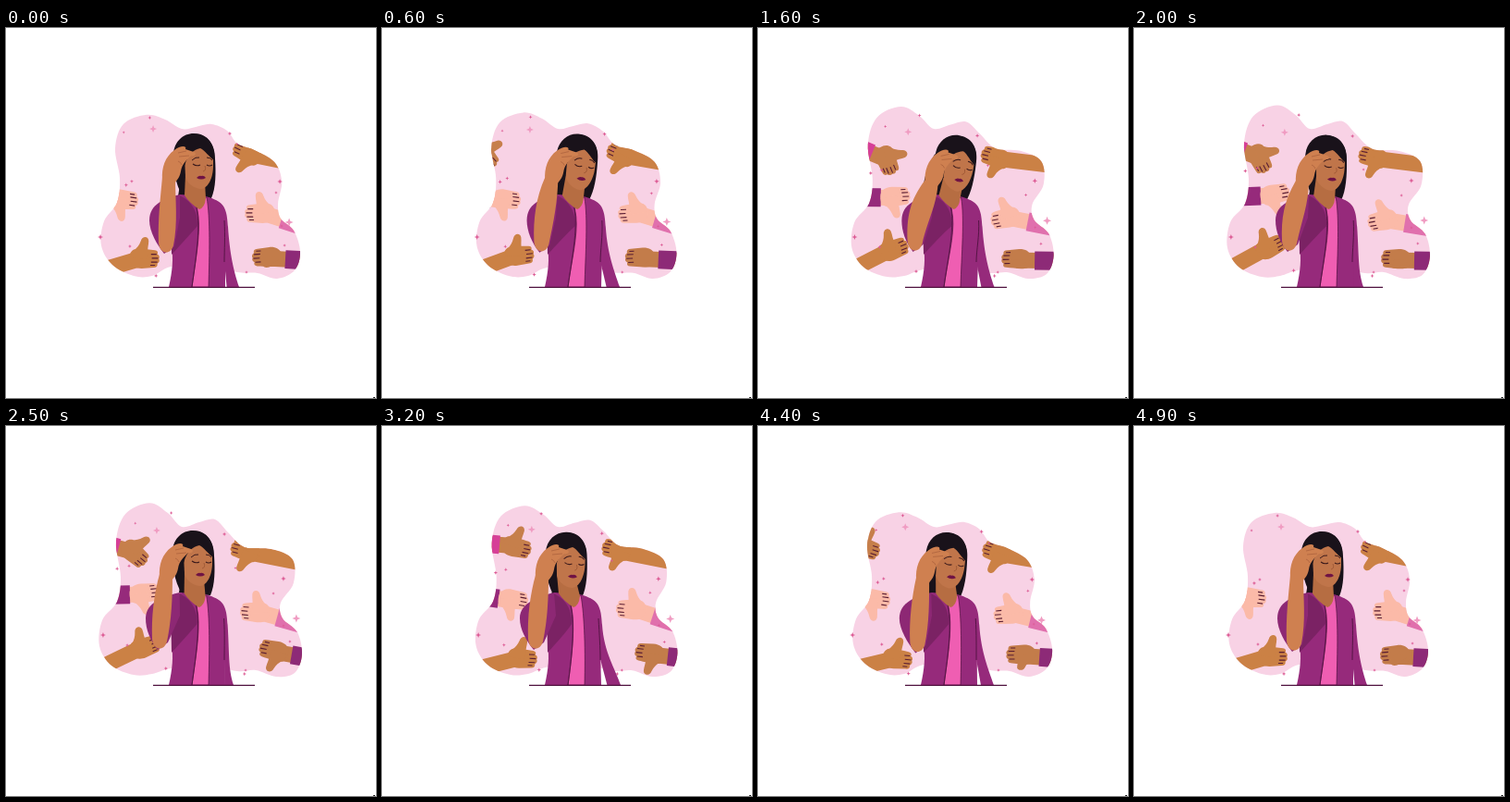
Write an HTML page with a canvas that moves like this. It is 400 px wide and 400 px high and loops after 5 s.

```html
<!DOCTYPE html>
<html lang="en">
<head>
<meta charset="utf-8">
<title>Thumbs</title>
<style>
html, body { margin: 0; width: 100%; height: 100%; overflow: hidden; background: #fff }
canvas { display: block; width: 400px; height: 400px }
</style>
</head>
<body>
<canvas id="stage" width="400" height="400"></canvas>
<script>
const c = document.getElementById('stage').getContext('2d');
const LOOP = 5000, STEP = 100, SPAN = 4900;
const times = [0, 1200, 2000, 2500, 3200, 4000];
const n = times.length;
const brown = '#cb8145', pale = '#fbbaa8', plum = '#962a7b', dark = '#7b2264',
      arm = '#cf8050', face = '#c0754a', hair = '#19121a', ink = '#4f123f';

// Smooth periodic curve through one value per entry of times
const timeAt = i => times[(i + n) % n] + Math.floor(i / n) * SPAN;
function at(v, t) {
  t = Math.min(t, SPAN);
  let i = n - 1;
  while (times[i] > t) i--;
  const val = j => v[(j + n) % n];
  const slope = j => (val(j + 1) - val(j - 1)) / (timeAt(j + 1) - timeAt(j - 1));
  const d = timeAt(i + 1) - times[i], u = (t - times[i]) / d, w = 1 - u;
  return w * w * (1 + 2 * u) * val(i) + u * u * (3 - 2 * u) * val(i + 1)
    + d * u * w * (w * slope(i) - u * slope(i + 1));
}
const mix = (a, b, k) => a + (b - a) * k;

function draw(d, fill, stroke, width = 1) {
  const p = new Path2D(d);
  if (fill) { c.fillStyle = fill; c.fill(p); }
  if (stroke) { c.strokeStyle = stroke; c.lineWidth = width; c.stroke(p); }
}

// Backdrop outline: small and large state
const small = [[152, 94], [127, 104], [118, 130], [123, 162], [120, 189], [106, 209], [103, 235],
  [115, 256], [138, 268], [158, 268], [178, 258], [215, 255], [250, 264], [272, 265], [293, 271], [312, 262],
  [318, 242], [311, 219], [297, 206], [294, 190], [298, 166], [290, 145], [268, 132], [250, 125],
  [239, 111], [222, 104], [205, 107], [190, 109], [172, 99]];
const large = [[155, 83], [129, 95], [119, 125], [124, 163], [120, 190], [104, 210], [101, 238],
  [114, 259], [138, 269], [158, 268], [178, 262], [215, 258], [250, 265], [270, 264], [292, 271], [312, 267],
  [320, 247], [315, 223], [299, 208], [297, 191], [311, 170], [310, 144], [287, 133], [258, 131],
  [240, 115], [226, 101], [209, 104], [190, 109], [175, 94]];

function blob(k) {
  const pts = small.map(([x, y], i) => [mix(x, large[i][0], k), mix(y, large[i][1], k)]);
  const get = i => pts[(i + pts.length) % pts.length];
  const path = new Path2D();
  path.moveTo(...pts[0]);
  pts.forEach((p, i) => {
    const a = get(i - 1), q = get(i + 1), b = get(i + 2);
    path.bezierCurveTo(p[0] + (q[0] - a[0]) / 6, p[1] + (q[1] - a[1]) / 6,
      q[0] - (b[0] - p[0]) / 6, q[1] - (b[1] - p[1]) / 6, ...q);
  });
  return path;
}

// sx, sy mirror a right-pointing thumbs-up; ends is where the forearm leaves the backdrop
const hands = [
  { sx: 1, sy: 1, skin: '#c67f4b', cuff: '#d63f97', gap: 19, ends: [100, 126],
    x: [92, 140, 137, 140, 146, 141], y: [131, 143, 141, 137, 130, 131], a: [30, 65, 62, 40, 12, 12] },
  { sx: 1, sy: -1, skin: pale, cuff: plum, gap: 16, ends: [100, 183],
    x: [127, 143, 153, 150, 142, 130], y: [187, 186, 181, 182, 189, 190], a: [8, 5, -10, -5, 10, 8] },
  { sx: 1, sy: 1, skin: brown, ends: [96, 264],
    x: [150, 147, 147, 150, 152, 152], y: [248, 241, 236, 238, 250, 252], a: [0, -15, -28, -22, 3, 8] },
  { sx: -1, sy: -1, skin: brown, ends: [330, 150],
    x: [260, 255, 258, 258, 253, 255], y: [136, 140, 141, 136, 135, 139], a: [25, 18, 12, 15, 12, 10] },
  { sx: -1, sy: 1, skin: pale, cuff: '#e070ad', gap: 25, ends: [330, 217],
    x: [274, 267, 268, 269, 269, 267], y: [199, 201, 207, 200, 197, 204], a: [0, -8, -10, 5, 5, -8] },
  { sx: -1, sy: -1, skin: '#c37c4a', cuff: '#8d2a77', gap: 20, ends: [335, 252],
    x: [282, 277, 283, 289, 289, 286], y: [249, 250, 251, 244, 247, 248], a: [-4, 0, 0, 12, 6, 3],
    thumb: [.45, .35, .4, 1, 1, .9] }
];

function line(x1, y1, x2, y2, color, width) {
  draw(`M${x1},${y1}L${x2},${y2}`, null, color, width);
}

function drawHand(h, t) {
  const x = at(h.x, t), y = at(h.y, t), [ex, ey] = h.ends;
  line(x, y, ex, ey, h.skin, 17);
  if (h.cuff) {
    const r = h.gap / Math.hypot(ex - x, ey - y);
    line(mix(x, ex, r), mix(y, ey, r), ex, ey, h.cuff, 20);
  }
  c.save();
  c.translate(x, y);
  c.rotate(at(h.a, t) * Math.PI / 180);
  c.scale(.85 * h.sx, .85 * h.sy);
  draw('M-14,-10C-8,-12 4,-10 13,-9Q18,-8 16,-4Q20,-2 18,2Q20,5 16,8Q17,13 11,13L-4,14C-12,14 -17,11 -19,5C-20,-2 -19,-7 -14,-10Z', h.skin);
  c.save();
  c.scale(1, h.thumb ? at(h.thumb, t) : 1);
  draw('M-19,0C-17,-9 -9,-10 -5,-21C-3,-28 5,-27 5,-21C5,-16 3,-11 4,-5L2,3Z', h.skin);
  c.restore();
  draw('M8,-4H15M9,1H17M8,6H16M7,10H13', null, '#5a1d33', 1.3);
  c.restore();
}

// x, y in the small state, x, y in the large state, radius
const sparks = [
  [155, 97, 179, 94, 2], [127, 113, 140, 105, 1.6], [159, 109, 163, 113, 4],
  [130, 170, 120, 154, 2.2], [136, 166, 133, 151, 2], [242, 114, 236, 117, 2.2],
  [250, 125, 248, 154, 1.6], [296, 166, 300, 165, 2.8], [292, 178, 289, 181, 1.8],
  [306, 210, 314, 208, 4.5], [298, 214, 300, 216, 1.6], [102, 226, 105, 226, 3],
  [134, 236, 131, 237, 2], [162, 268, 173, 262, 2.2], [245, 268, 258, 268, 2.2],
  [260, 264, 259, 264, 1.8], [301, 235, 307, 233, 1.8]];

function drawSpark([x1, y1, x2, y2, r], k) {
  const x = mix(x1, x2, k), y = mix(y1, y2, k);
  c.fillStyle = r > 3.5 ? '#f09cc2' : '#dc5a94';
  c.beginPath();
  for (let i = 0; i < 8; i++) {
    const q = i % 2 ? r * .4 : r, a = i * Math.PI / 4;
    c.lineTo(x + q * Math.cos(a), y + q * Math.sin(a));
  }
  c.fill();
}

const pose = {
  headX: [211, 219, 214, 210, 206, 208], headY: [161, 164, 163, 160, 162, 164], tilt: [0, 15, 3, 0, 2, 11],
  lockX: [187, 167, 190, 188, 184, 160], lockY: [182, 188, 182, 180, 184, 194],
  wristX: [176, 190, 182, 173, 173, 180], wristY: [161, 163, 165, 160, 161, 165],
  elbowX: [174, 172, 169, 167, 167, 172], elbowY: [236, 234, 234, 234, 234, 238],
  sleeve: [155, 157, 153, 151, 149, 151], hem: [252, 261, 248, 246, 258, 258]
};

function inHead(p, paint) {
  c.save();
  c.translate(p.headX, p.headY);
  c.rotate(p.tilt * Math.PI / 180);
  paint();
  c.restore();
}

function woman(t) {
  const p = {};
  for (const key in pose) p[key] = at(pose[key], t);
  const { headX: hx, headY: hy, lockX: lx, lockY: ly, wristX: wx, wristY: wy,
          elbowX: ex, elbowY: ey, sleeve: sl, hem } = p;
  const s = (hx - 211) * .4, gap = Math.max(0, hem - 250) * .8;

  // Hair behind
  draw(`M${hx - 26},${hy - 28}C${lx + 4},${hy - 12} ${lx + 2},${ly - 18} ${lx - 1},${ly}L${lx + 16},${ly}L${hx - 6},${hy + 8}Z`, hair);
  if (lx < 176) line(hx - 27, hy - 18, lx + 4, ly - 3, '#fff', 1.4);
  inHead(p, () => draw('M-8,-47C8,-47 15,-34 15,-20C16,-5 16,12 11,23L-20,21C-28,8 -31,-12 -30,-25C-29,-38 -20,-47 -8,-47Z', hair));

  // Jacket and shirt
  draw(`M${226 + s},186C${239 + s},190 ${239 + s},204 ${240 + s},215C${242 + s},245 ${hem - 6},262 ${hem},280H${237 + gap}L236,252L${232 + s},215Z`, plum);
  draw(`M${188 + s},180L${216 + s},182C${230 + s},186 ${236 + s},190 ${237 + s},206L237,280H176C180,262 181,250 179,236Z`, plum);
  draw(`M${236 + s},208C${237 + s},225 236,240 236,253`, null, ink, .9);
  draw(`M${205 + s},185L${217 + s},183C${221 + s},205 220,245 219,280H201C205,250 ${210 + s},225 ${208 + s},204Z`, '#ef5eb2', ink, .7);
  draw(`M${187 + s},181C${200 + s},186 ${208 + s},199 ${207 + s},214C200,222 188,235 179,245L178,190Z`, dark);
  draw(`M${205 + s},190C${211 + s},212 206,245 201,280`, null, ink, .8);

  // Neck and head
  draw(`M${hx - 17},${hy - 2}L${hx + 4},${hy + 6}L${216 + s},184Q${215 + s},194 ${209 + s},196Q${199 + s},190 ${193 + s},181Z`, '#b66d42');
  inHead(p, () => {
    draw('M-18,-22L-17,0C-15,8 -6,13 0,13C8,12 13,0 13,-12L13,-28C0,-38 -12,-34 -18,-22Z', face);
    draw('M-25,-18C-26,-46 -8,-49 0,-45C10,-42 16,-30 14,-18C9,-21 4,-29 -1,-31C-8,-29 -14,-26 -18,-12Z', hair);
    draw('M-10,-18Q-6,-22 -2,-21M6,-21Q10,-21 12,-18', null, '#3b1a1c', 1);
    draw('M-9,-14Q-5,-11 -1,-13M6,-13Q9,-11 12,-13', null, '#3b1a1c', 1.1);
    draw('M4,-12Q6,-7 2,-6', null, '#9b5534', .8);
    draw('M-5,1Q-2,-2 0,-1Q3,-2 5,1Q0,4 -5,1Z', '#701344');
  });

  // Raised arm
  draw(`M${188 + s},180C172,184 ${sl},190 ${sl},208C${sl},220 ${ex - 11},${ey - 2} ${ex - 3},${ey + 8}L${ex + 8},${ey}L188,205Z`, '#8d2874');
  draw(`M${wx - 7},${wy}C${ex - 7},${wy + 22} ${ex - 10},${ey - 28} ${ex - 9},${ey - 4}C${ex - 8},${ey + 9} ${ex + 4},${ey + 10} ${ex + 7},${ey - 1}C${ex + 12},${ey - 25} ${wx + 7},${wy + 25} ${wx + 7},${wy}Z`, arm);
  c.save();
  c.translate(wx, wy);
  draw('M-7,3C-8,-10 -4,-22 6,-29C12,-34 20,-34 18,-30L27,-27C31,-25 28,-22 24,-23C20,-19 14,-14 13,-6C12,0 9,3 7,6Z', arm);
  draw('M10,-26L19,-28M11,-22L22,-23M10,-17Q13,-16 14,-13', null, '#ad633e', .8);
  c.restore();

  line(159, 280.4, 269, 280.4, ink, 1.3);
}

function frame(now) {
  const t = Math.floor(now % LOOP / STEP) * STEP;
  const k = (1 - Math.cos(2 * Math.PI * (t + 200) / LOOP)) / 2;
  c.fillStyle = '#fff';
  c.fillRect(0, 0, 400, 400);
  c.save();
  const back = blob(k);
  c.fillStyle = '#f8d2e5';
  c.fill(back);
  c.clip(back);
  hands.forEach(h => drawHand(h, t));
  c.restore();
  sparks.forEach(s => drawSpark(s, k));
  woman(t);
  c.fillStyle = '#222';
  c.fillRect(397, 399, 2, 1);
}

const start = performance.now();
function tick() {
  frame(performance.now() - start);
  requestAnimationFrame(tick);
}
tick();
</script>
</body>
</html>
```
